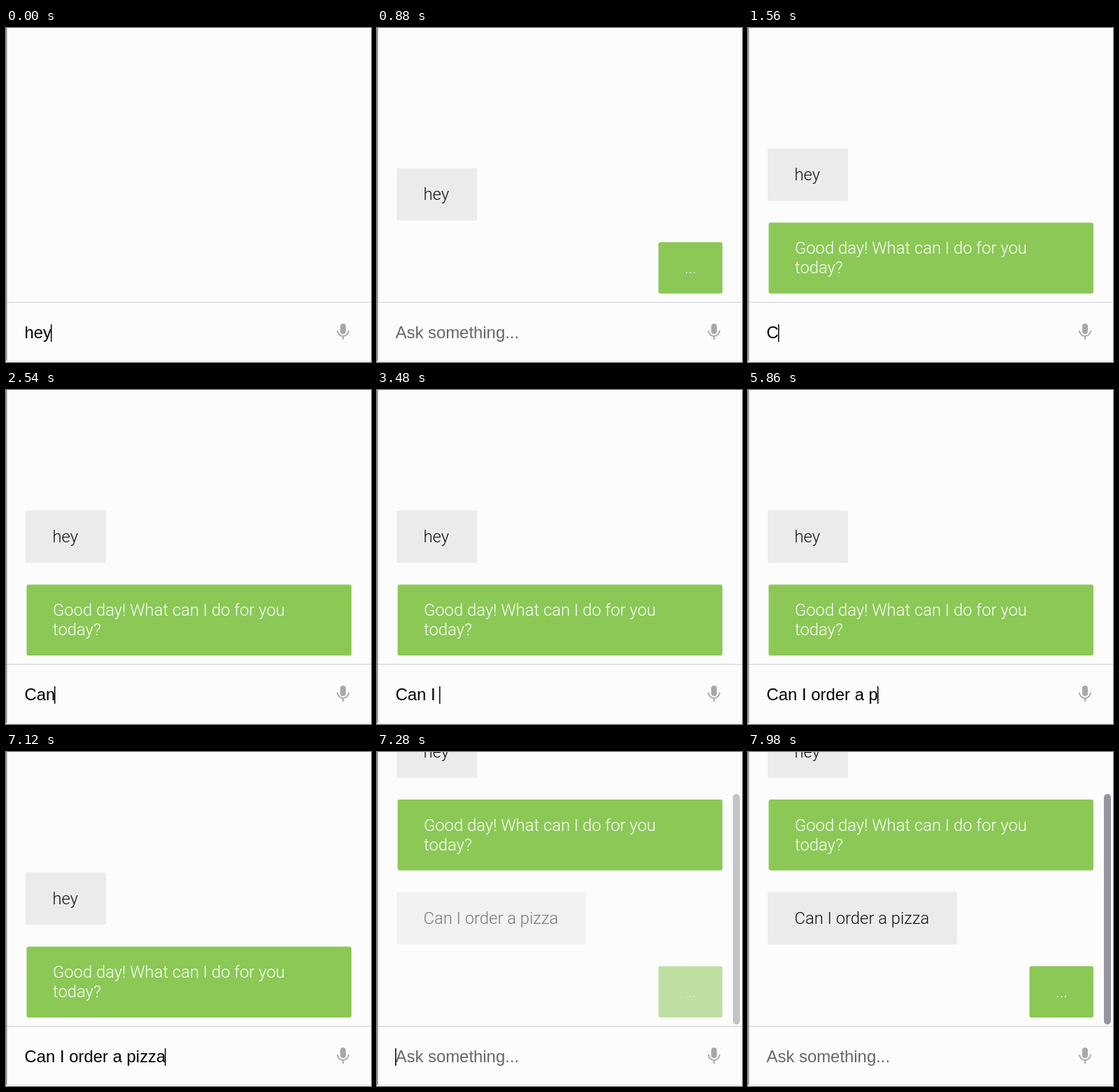
An HTML page with a canvas for the animation above (8 s loop, 522 by 478 pixels).

```html
<!DOCTYPE html>
<html lang="en">
<head>
<meta charset="utf-8">
<title>Chat</title>
<style>
  html, body { margin: 0; width: 100%; height: 100%; overflow: hidden; background: #fcfcfc; }
  canvas { display: block; }
</style>
</head>
<body>
<canvas id="stage" width="522" height="478"></canvas>
<script>
const ctx = document.getElementById('stage').getContext('2d');
const LOOP = 8000, BLINK = 560, FADE = 150;
const LIST_BOTTOM = 392, BASE = 380, GAP = 31;
const INPUT_FONT = '23.9px "Liberation Sans", Arial, sans-serif';
const CHAT_FONT = '300 23.8px Roboto, sans-serif';
const COLORS = {
  paper: '#fcfcfc', user: '#ebebee', bot: '#8bc856',
  userText: '#111', botText: '#fff', hint: '#666',
  rule: '#cfcfd6', edge: '#8a8a8a', mic: '#a8a8aa', thumb: '#96969e'
};

const ENTER_1 = 40, REPLY = 1180, ENTER_2 = 7200;
const QUESTION = 'Can I order a pizza';
const KEYS = [1540, 2100, 2280, 2640, 2960, 3100, 4320, 4500, 4680, 4860,
              5020, 5180, 5320, 5520, 5840, 6120, 6400, 6720, 7000];

const messages = [
  { from: 'user', at: ENTER_1, lines: ['hey'] },
  { from: 'bot', at: ENTER_1, until: REPLY, lines: ['...'] },
  { from: 'bot', at: REPLY, lines: ['Good day! What can I do for you', 'today?'] },
  { from: 'user', at: ENTER_2, lines: [QUESTION] },
  { from: 'bot', at: ENTER_2, lines: ['...'] }
];

const clamp = v => Math.max(0, Math.min(1, v));

function box(x, y, w, h, r, color) {
  ctx.fillStyle = color;
  ctx.beginPath();
  ctx.roundRect(x, y, w, h, r);
  ctx.fill();
}

function write(text, x, y, font, color) {
  ctx.font = font;
  ctx.fillStyle = color;
  ctx.fillText(text, x, y);
}

const heightOf = msg => msg.from === 'user' ? 75 : 45.5 + 28 * msg.lines.length;

function drawUser(msg, y) {
  ctx.font = CHAT_FONT;
  const width = Math.round(ctx.measureText(msg.lines[0]).width) + 78;
  box(28, y, width, 75, 2, COLORS.user);
  write(msg.lines[0], 66.5, y + 45.5, CHAT_FONT, COLORS.userText);
}

function drawBot(msg, y) {
  const left = msg.lines.length > 1 ? 29.5 : 402.5;
  box(left, y, 494 - left, heightOf(msg), 3, COLORS.bot);
  msg.lines.forEach((line, i) =>
    write(line, left + 37.5, y + 44.5 + i * 28, CHAT_FONT, COLORS.botText));
}

function drawMessages(t) {
  ctx.save();
  ctx.beginPath();
  ctx.rect(0, 0, 522, LIST_BOTTOM);
  ctx.clip();
  const visible = messages.filter(m => t >= m.at && t < (m.until ?? LOOP));
  let y = BASE;
  for (const msg of visible.reverse()) {
    y -= heightOf(msg);
    ctx.globalAlpha = clamp((t - msg.at) / FADE);
    (msg.from === 'user' ? drawUser : drawBot)(msg, y);
    y -= GAP;
  }
  if (t >= ENTER_2) {
    ctx.globalAlpha = clamp((t - ENTER_2) / FADE);
    box(509, 60, 10, 330, 5, COLORS.thumb);
  }
  ctx.restore();
}

function inputState(t) {
  if (t < ENTER_1) return { text: 'hey', last: 0 };
  if (t >= ENTER_2) return { text: '', last: ENTER_2 };
  const count = KEYS.filter(k => k <= t).length;
  return { text: QUESTION.slice(0, count), last: count ? KEYS[count - 1] : ENTER_1 };
}

function drawMic() {
  box(478, 423, 8, 15, 4, COLORS.mic);
  ctx.strokeStyle = COLORS.mic;
  ctx.lineWidth = 2;
  ctx.beginPath();
  ctx.arc(482, 433, 8, 0, Math.PI);
  ctx.moveTo(482, 441);
  ctx.lineTo(482, 446);
  ctx.stroke();
}

function drawInput(t) {
  box(0, LIST_BOTTOM, 522, 1, 0, COLORS.rule);
  box(0, 476, 522, 1, 0, '#e8e8ea');
  const { text, last } = inputState(t);
  write(text || 'Ask something...', 26.5, 444, INPUT_FONT, text ? '#000' : COLORS.hint);
  if (Math.floor((t - last) / BLINK) % 2 === 0) {
    box(Math.floor(26 + ctx.measureText(text).width), 424, 1.5, 25, 0, '#000');
  }
  drawMic();
}

function draw(t) {
  box(0, 0, 522, 478, 0, COLORS.paper);
  drawMessages(t);
  drawInput(t);
  box(0, 0, 1.4, 476, 0, COLORS.edge);
}

const start = performance.now();
function tick() {
  draw((performance.now() - start) % LOOP);
  requestAnimationFrame(tick);
}
tick();
</script>
</body>
</html>
```
